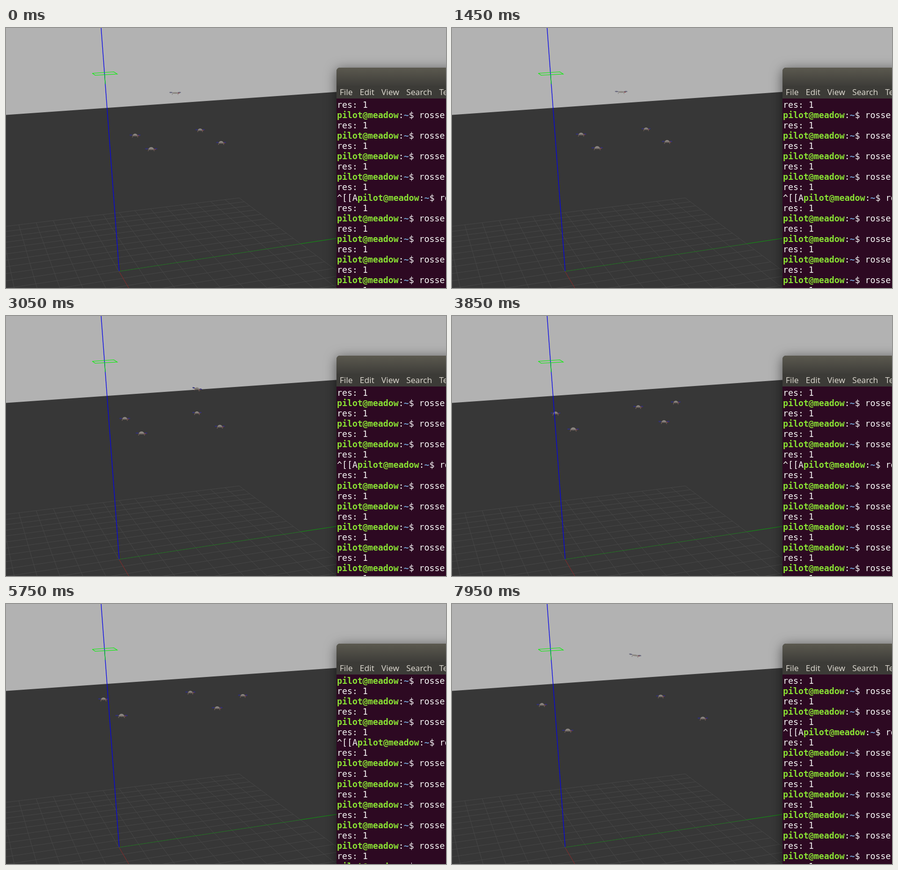
These frames come from a looping animation (900x531 px, 8000 ms). An HTML page with a canvas:

```html
<!DOCTYPE html>
<html>
<head>
<meta charset="utf-8">
<style>
  html, body { margin: 0; overflow: hidden; }
  canvas { display: block; }
</style>
</head>
<body>
<canvas id="stage" width="900" height="531"></canvas>
<script>
const ctx = document.getElementById('stage').getContext('2d');
const LOOP = 8000;
const MOVES = [2550, 6330];
// Each move is preceded by two commands in the terminal
const COMMANDS = MOVES.flatMap(start => [start - 850, start - 350]);

// The formation settles at three poses, one before and one after each move
const drones = [
  { size: 11.5, poses: [[264, 219], [199, 196], [182, 209]] },
  { size: 13, poses: [[297, 247], [236, 230], [237, 264]] },
  { size: 10.5, poses: [[397, 208], [377, 182], [433, 191]] },
  { size: 11.5, poses: [[440, 234], [432, 214], [523, 238]] },
  { size: 10.5, poses: [[346, 132], [485, 189], [361, 96]], lead: true }
];

const bump = (t, center, width) => Math.exp(-(((t - center) / width) ** 2));

// Critically damped approach from 0 to 1
function settle(t, start) {
  const u = Math.max(0, t - start) / 430;
  return 1 - (1 + u) * Math.exp(-u);
}

function position({ poses: [a, b, c] }, t) {
  const [p, q] = MOVES.map(start => settle(t, start));
  const [x, y] = [0, 1].map(k => a[k] + (b[k] - a[k]) * p + (c[k] - b[k]) * q);
  return [x, y - 2 * Math.min(1, t / 1400) - 4 * bump(t, 2450, 250)];
}

function path(points, color, width = 1) {
  ctx.beginPath();
  points.forEach(p => ctx.lineTo(...p));
  ctx.strokeStyle = color;
  ctx.lineWidth = width;
  ctx.stroke();
}

function oval(x, y, rx, ry, color, from = 0) {
  ctx.beginPath();
  ctx.ellipse(x, y, rx, ry, 0, from, 2 * Math.PI);
  ctx.fillStyle = color;
  ctx.fill();
}

// Ground metres to screen
function project(x, y) {
  const w = 1 - 0.0232 * x + 0.00971 * y;
  return [(231 + 2.76 * x + 43.06 * y) / w, (497 + 2.27 * x - 1.31 * y) / w];
}

function drawWorld() {
  ctx.fillStyle = '#b2b2b2';
  ctx.fillRect(0, 0, 900, 531);
  ctx.beginPath();
  [[0, 177.4], [900, 114.9], [900, 531], [0, 531]].forEach(p => ctx.lineTo(...p));
  ctx.fillStyle = '#373737';
  ctx.fill();
  for (let i = -10; i <= 10; i++) {
    path([project(-10, i), project(10, i)], '#484848', 0.9);
    path([project(i, -10), project(i, 10)], '#484848', 0.9);
  }
}

function drawAxes() {
  ctx.save();
  ctx.translate(0.5, 0.5);
  path([[231, 497], [251, 531]], '#862626');
  path([[231, 496.5], [603, 440]], '#1f701f');
  path([[603, 440], [676, 429]], '#0f960f', 1.2);
  path([[194, -1], [231, 496]], '#0404e8', 1.3);
  path([[201.3, 96], [202.6, 114]], '#10e010', 1.3);
  path([[176, 92], [220, 89], [227, 93.5], [182, 96], [176, 92]], '#08f008', 1.2);
  ctx.restore();
}

function drawDrone(drone, index, t) {
  const [x, y] = position(drone, t);
  const inSky = y < 145;
  const size = drone.size + (inSky ? 2.5 : 0);
  const arm = size * (0.95 + 0.05 * Math.cos(t / 37 + index));
  const s = size / 12;
  const legs = inSky ? '#8a8582' : '#75605a';
  ctx.save();
  ctx.translate(x, y);
  if (drone.lead) ctx.rotate(0.2 * bump(t, 3050, 350) + 0.16 * settle(t, MOVES[1]));
  path([[-arm * 0.85, 0], [arm * 0.85, 0]], inSky ? '#85858a' : '#5a5258', 1.5);
  for (const side of [-1, 1]) {
    oval(side * arm * 0.75, -0.4, arm * 0.25, 1.2, inSky ? '#66667c' : '#30307a');
    path([[side * 4 * s, 1], [side * 6 * s, 4.5]], legs, 1.3);
  }
  oval(arm * 0.6, 1, arm * 0.15, 0.9, '#85484a');
  oval(0, 1.2, 5 * s, inSky ? 2.4 : 4.6 * s, inSky ? '#96938c' : '#8c8681', Math.PI);
  oval(0, 1.2, 4.5 * s, 1.1, inSky ? '#88847e' : '#6e6560');
  ctx.restore();
}

function write(text, x, y, color, bold) {
  ctx.font = (bold ? 'bold ' : '') + '17.44px "DejaVu Sans Mono", monospace';
  ctx.fillStyle = color;
  ctx.fillText(text, x, y);
  return x + ctx.measureText(text).width;
}

function drawWindow() {
  ctx.save();
  ctx.shadowColor = 'rgba(0,0,0,.55)';
  ctx.shadowBlur = 24;
  ctx.shadowOffsetY = 4;
  ctx.beginPath();
  ctx.roundRect(676, 81, 300, 500, 7);
  ctx.fillStyle = '#3c3b37';
  ctx.fill();
  ctx.restore();

  const bar = ctx.createLinearGradient(0, 81, 0, 118);
  bar.addColorStop(0, '#5b594f');
  bar.addColorStop(1, '#3e3d39');
  ctx.beginPath();
  ctx.roundRect(676, 81, 300, 37, [7, 0, 0, 0]);
  ctx.fillStyle = bar;
  ctx.fill();

  ctx.font = '16.8px "Open Sans", "Noto Sans", sans-serif';
  ctx.fillStyle = '#dfdbd2';
  let x = 682.5;
  for (const label of ['File', 'Edit', 'View', 'Search', 'Terminal']) {
    ctx.fillText(label, x, 137);
    x += ctx.measureText(label).width + 14.5;
  }
}

function drawTerminal(t) {
  const white = '#f8f8f8';
  ctx.fillStyle = '#2d0922';
  ctx.fillRect(676, 144, 224, 387);
  const scroll = COMMANDS.filter(time => t >= time).length;
  for (let row = 0; row < 19; row++) {
    const line = row + scroll, y = 163 + row * 21.06;
    let x = 677;
    if (line % 2 === 0) {
      write('res: 1', x, y, white);
      continue;
    }
    if (line === 9) x = write('^[[A', x, y, white);
    x = write('pilot@meadow', x, y, '#8ae234', true);
    x = write(':', x, y, white);
    x = write('~', x, y, '#729fcf', true);
    write('$ rosse', x, y, white);
  }
}

function frame(now) {
  const t = Math.floor(now % LOOP / 50) * 50;
  drawWorld();
  drones.forEach((drone, i) => drawDrone(drone, i, t));
  drawAxes();
  drawWindow();
  drawTerminal(t);
  requestAnimationFrame(frame);
}
requestAnimationFrame(frame);
</script>
</body>
</html>
```
